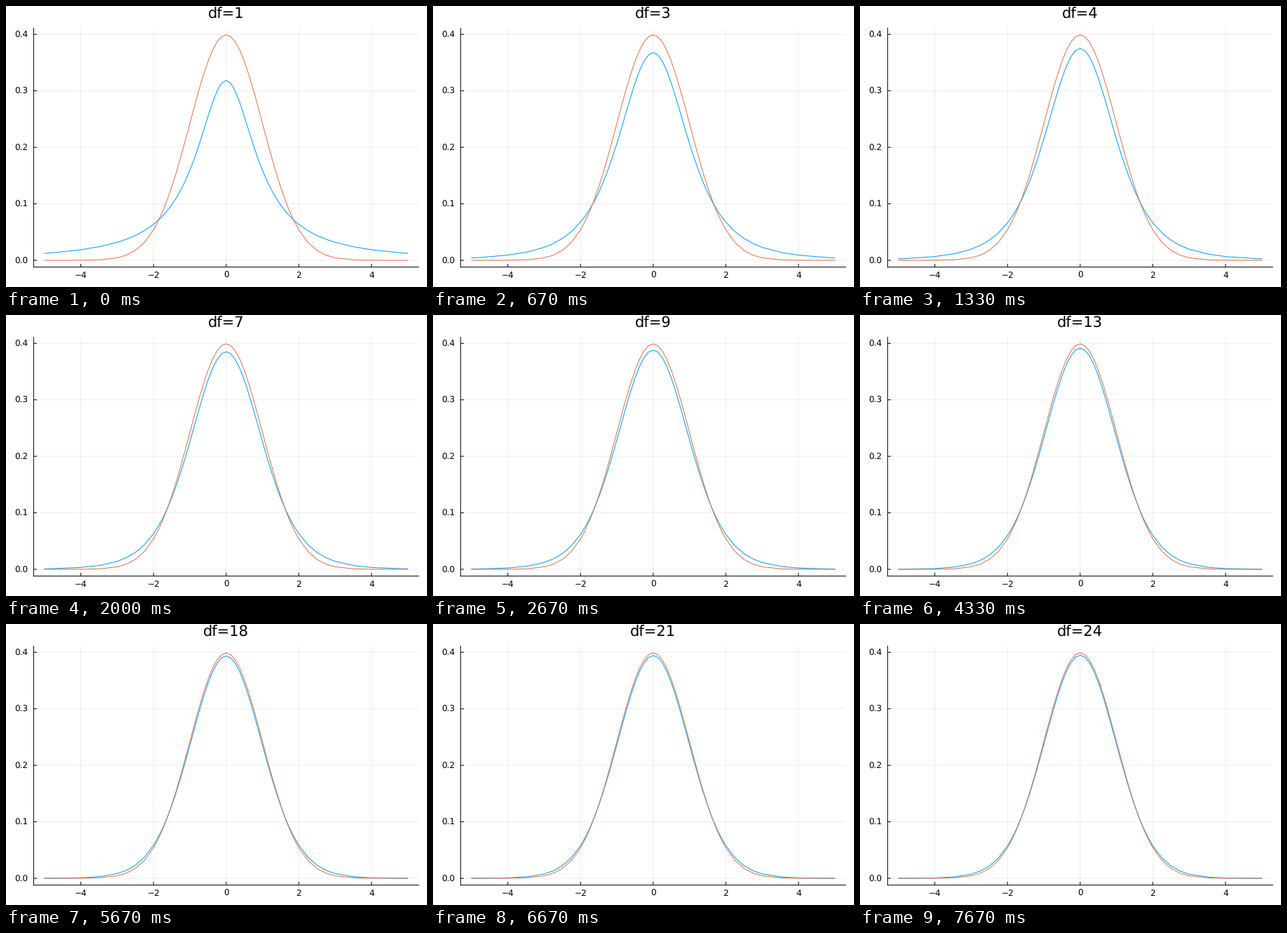
These frames come from a looping animation (600 by 400 pixels, 8000 ms). A matplotlib script:

```python
import math

import matplotlib.pyplot as plt
import numpy as np
from matplotlib.animation import FuncAnimation

WIDTH, HEIGHT, DPI = 600, 400, 100
PX = 72 / DPI  # points per pixel
LEFT, RIGHT, TOP, BOTTOM = 39.37, 588.19, 31.5, 371.65
X_MAX, PEAK = 5, 1 / math.sqrt(2 * math.pi)
MARGIN = 0.03
TICK = 4.6
FRAMES, LOOP_MS = 24, 8000

plt.rcParams.update({"font.family": "DejaVu Sans", "text.hinting": "none"})


def to_px_x(x):
    span = 2 * X_MAX * (1 + 2 * MARGIN)
    return (LEFT + RIGHT) / 2 + np.asarray(x) * (RIGHT - LEFT) / span


def to_px_y(y):
    scale = (BOTTOM - TOP) / (PEAK * (1 + 2 * MARGIN))
    return BOTTOM - (np.asarray(y) + MARGIN * PEAK) * scale


def normal_pdf(x):
    return PEAK * np.exp(-x**2 / 2)


def student_pdf(x, df):
    norm = math.gamma((df + 1) / 2) / (math.sqrt(df * math.pi) * math.gamma(df / 2))
    return norm * (1 + x**2 / df) ** (-(df + 1) / 2)


# Coarse samples in the tails, finer ones towards the centre.
xs = np.concatenate([
    [-5, -4.87, -4, -3.45],
    np.arange(-3, -2, 0.25),
    np.arange(-2, 2, 0.125),
    np.arange(2, 3.1, 0.25),
    [3.54, 4, 4.87, 5],
])

fig = plt.figure(figsize=(WIDTH / DPI, HEIGHT / DPI), dpi=DPI, facecolor="white")
ax = fig.add_axes([0, 0, 1, 1])
ax.set(xlim=(0, WIDTH), ylim=(HEIGHT, 0))
ax.axis("off")


def stroke(x, y, color="black", **style):
    return ax.plot(x, y, color=color, lw=PX, snap=False, **style)[0]


def label(x, y, text, size, ha="center"):
    return ax.text(x, y, text, fontsize=size * PX, ha=ha, va="baseline")


x_ticks = [(to_px_x(v), f"{v}".replace("-", "\u2212")) for v in range(-4, 5, 2)]
y_ticks = [(to_px_y(k / 10), f"{k / 10:.1f}") for k in range(5)]

for x, _ in x_ticks:
    stroke([x, x], [TOP, BOTTOM], alpha=0.07, solid_capstyle="butt")
for y, _ in y_ticks:
    stroke([LEFT, RIGHT], [y, y], alpha=0.07, solid_capstyle="butt")

stroke([LEFT, LEFT], [TOP, BOTTOM])
stroke([LEFT, RIGHT], [BOTTOM, BOTTOM])
for x, text in x_ticks:
    stroke([x, x], [BOTTOM, BOTTOM - TICK], solid_capstyle="butt")
    label(x, 387.3, text, 12)
for y, text in y_ticks:
    stroke([LEFT, LEFT + TICK], [y, y], solid_capstyle="butt")
    label(31.7, y + 4.4, text, 12, ha="right")

student_line = stroke(to_px_x(xs), to_px_y(student_pdf(xs, 1)), "#009AFA")
stroke(to_px_x(xs), to_px_y(normal_pdf(xs)), "#E36F47")
title = label((LEFT + RIGHT) / 2, 18, "df=1", 21)


def update(frame):
    df = frame + 1
    student_line.set_ydata(to_px_y(student_pdf(xs, df)))
    title.set_text(f"df={df}")
    return student_line, title


anim = FuncAnimation(fig, update, frames=FRAMES, interval=LOOP_MS / FRAMES,
                     repeat=True, repeat_delay=0)
plt.show()
```
